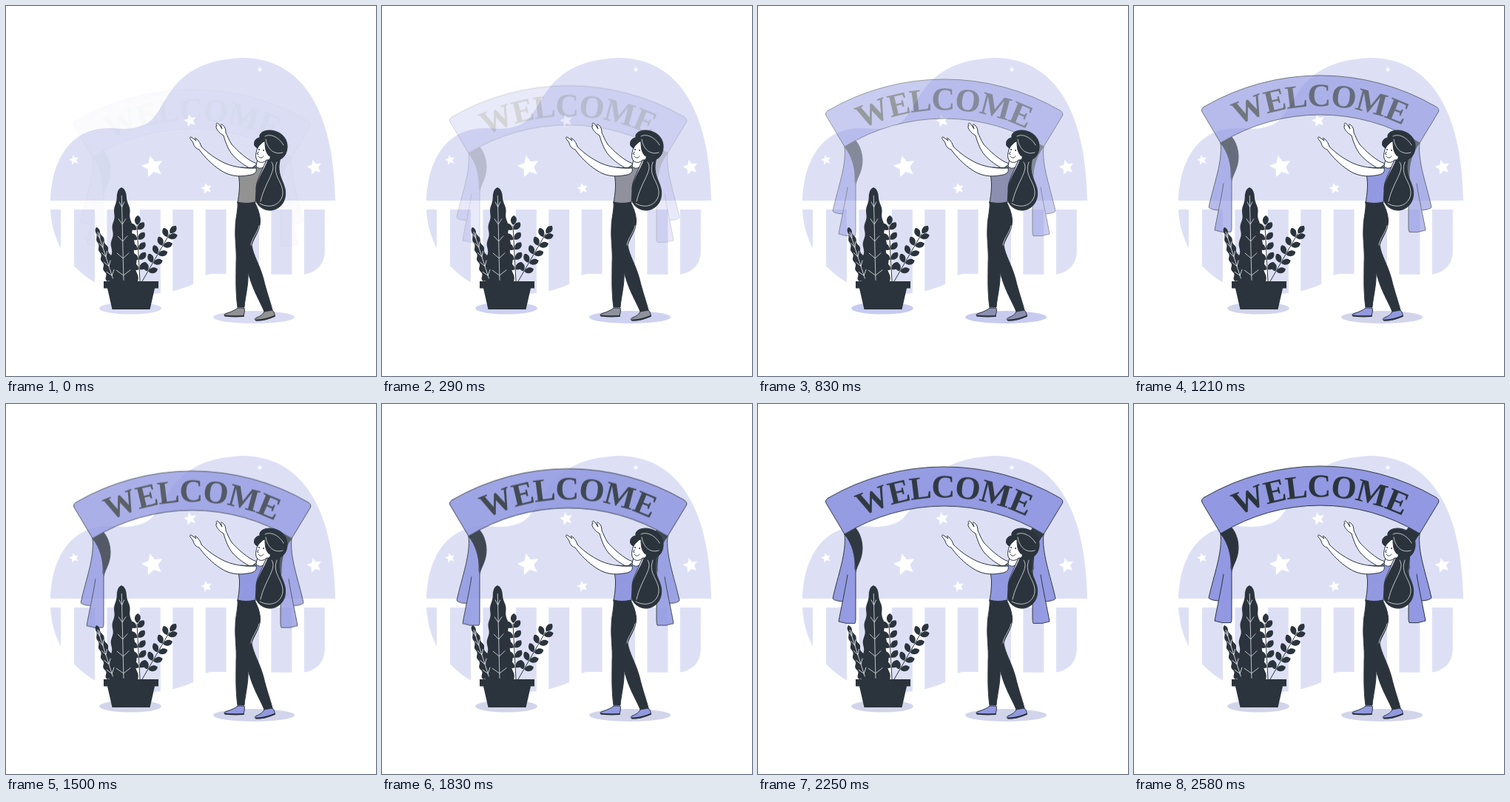
Write an HTML page that moves like this. It is 500 px wide and 500 px high and loops after 2.62 s.

```html
<!DOCTYPE html>
<html lang="en">
<head>
<meta charset="utf-8">
<title>Welcome</title>
<style>
html, body { margin: 0; width: 100%; height: 100%; overflow: hidden; background: #fff; }
svg { display: block; width: 100%; height: 100%; }
.bg { fill: #dde0f5; }
.dark { fill: #2b343c; }
.skin { fill: #fff; }
.cloth { fill: #9299e2; }
.line { stroke: #2b343c; stroke-linejoin: round; stroke-linecap: round; }
.vein { fill: none; stroke: #e4e6ee; stroke-width: .8; stroke-linecap: round; }
.ink { fill: none; }
.sole { fill: none; stroke-width: 2; }
.title { font: bold 44px "Liberation Serif", "Times New Roman", serif; letter-spacing: -1.3px; text-anchor: middle; }
.banner { animation: rise 2620ms cubic-bezier(0, 0, .55, 1) infinite; }
.top { animation: tint 2620ms linear infinite; }
.shade { animation: shade 2620ms linear infinite; }
@keyframes rise {
  from { opacity: .035; transform: translateY(29px); }
  to { opacity: 1; transform: none; }
}
@keyframes tint {
  from { fill: #929292; }
  32% { fill: #8c8fb0; }
  46%, to { fill: #9299e0; }
}
@keyframes shade {
  from { fill: #d8dbf2; }
  19%, 32% { fill: #c7cbef; }
  46%, to { fill: #d2d5ea; }
}
</style>
</head>
<body>
<svg viewBox="0 0 500 500">
  <defs>
    <clipPath id="base">
      <path d="M60 275C62 310 75 345 119 373C150 395 215 394 253 376C262 368 267 363 278 362C320 362 360 363 398 363C420 362 431 348 431 330V275Z"/>
    </clipPath>
    <path id="arc" d="M112 167A255 255 0 0 1 391 167"/>
    <g id="drape" class="line">
      <path class="cloth" d="M117 175C120 200 108 230 101 262Q103 265 114 266L131 240V222C132 205 128 188 117 175Z"/>
      <path class="dark" d="M117 175L132 167C139 175 143 190 140 203C138 213 134 217 132 226C132 205 128 188 117 175Z"/>
      <path class="cloth" d="M121 230C118 250 112 276 109 293Q120 297 131 295.500Q132 293 132 290V222"/>
    </g>
  </defs>

  <path class="bg" d="M60 263C62 210 85 165 140 165C160 166 170 168 190 159C220 142 215 75 318 70C400 70 443 140 445 263Z"/>
  <g id="fence" class="bg" clip-path="url(#base)"></g>
  <g id="stars" fill="#fff"></g>
  <g class="shade">
    <ellipse cx="168" cy="408.500" rx="42" ry="8"/>
    <ellipse cx="335" cy="420.500" rx="55" ry="8.500"/>
  </g>

  <g class="banner">
    <use href="#drape"/>
    <use href="#drape" transform="translate(503) scale(-1 1)"/>
    <path class="cloth line" d="M95 126A312 312 0 0 1 408 126Q413 129 411.500 133L386 175A257 257 0 0 0 117 175L92 133Q90 129 95 126Z"/>
    <text class="title dark"><textPath href="#arc" startOffset="49.800%">WELCOME</textPath></text>
  </g>

  <g id="plant" class="dark">
    <path d="M132 372H206V381.500H201L194.500 410H143.500L137 381.500H132Z"/>
  </g>

  <g class="line">
    <path class="dark" d="M354 208C351 220 337 236 336 256C337 271 350 277 359 276C372 274 380 262 377 247C374 234 365 226 371 205Z"/>
    <path class="skin" d="M339 213C328 210 312 195 305 187C301 181 299 175 297 171C297 167 296 163 293 161C291 159 290 159 291 163L292 166L287 159C285 157 283 159 285 162L284 162C283 165 288 172 294 175C297 186 301 195 306 201C314 210 323 216 331 220Z"/>
    <path class="top" d="M318 218C327 219 332 219 337 217L348 217C344 228 337 237 338 250L337 266Q325 269 313 266C315 254 317 240 314 228Z"/>
    <path class="skin" d="M340 207L338 216C339 219 345 221 348 217L353 206Z"/>
    <path class="skin" d="M338 219C320 220 304 217 291 210C278 203 270 196 264 190C263 186 261 183 258 180C255 177 255 178 257 182L250 177C248 177 248 179 251 182L253 185C254 190 257 193 261 194C269 205 278 214 290 222C302 230 314 231 326 229C334 228 340 226 338 219Z"/>
    <path class="dark" d="M313 265Q325 268 336 265C341 275 345 286 343 296C341 307 335 313 332 323C334 337 343 350 348 369C352 386 357 399 360 411L349 413C344 400 334 386 327 359C328 377 323 393 322 407H313C310 386 311 365 311 348C312 330 309 314 310 300C310 286 314 276 313 265Z"/>
    <path class="top" d="M313 408H322C323 412 322 415 321 419H297C293 418 295 416 299 415C305 413 310 411 313 408Z"/>
    <path class="top" d="M349 413L360 411C362 413 364 417 363 419C356 422 350 425 339 425C335 425 336 422 339 421C344 419 348 416 349 413Z"/>
    <path class="sole" d="M296 418.500Q308 420 321 419M338 424.500C348 425 356 422 363 419"/>
  </g>
  <path class="vein" d="M342 297C340 307 332 314 331 323M359 211C367 222 350 237 344 264M366 211C359 230 375 237 374 254C372 268 358 275 343 267"/>

  <g class="line">
    <path class="dark" d="M340 192C333 190 334 179 343 178C341 170 353 166 363 169C375 172 381 182 380 192C379 204 370 211 357 209Z"/>
    <path class="skin" d="M342 186C338 196 336 203 339 208C342 213 349 212 352 208C357 209 359 203 355 202C351 198 350 192 350 183Z"/>
    <path class="dark" d="M340 192C342 187 350 183 351 178C352 188 354 196 358 202L364 194L353 173L343 179Z"/>
    <path class="ink" d="M341 203C343 206 346 206 348 203M341 197L339.500 200L341 200.500"/>
  </g>
  <g class="dark"><circle cx="342" cy="194" r="1"/><circle cx="348" cy="195" r="1"/></g>
  <path class="vein" d="M350 176C357 172 369 177 375 188M351 180C353 193 362 202 374 198"/>
</svg>
<script>
const add = (parent, tag, attrs) => {
  const el = document.createElementNS("http://www.w3.org/2000/svg", tag);
  for (const k in attrs) el.setAttribute(k, attrs[k]);
  parent.append(el);
  return el;
};
const [fence, stars, plant] = ["fence", "stars", "plant"].map(id => document.getElementById(id));
const range = (n, fn) => Array.from({ length: n }, (_, i) => fn(i));
const deg = a => a * 180 / Math.PI;

add(fence, "rect", { x: 60, y: 275, width: 14, height: 120 });
range(8, i => add(fence, "rect", { x: 92 + 44.4 * i, y: 275, width: 28, height: 120 }));

const star = (x, y, r) => {
  const points = range(10, i => {
    const a = i * Math.PI / 5 - 1.8, d = i % 2 ? r * .47 : r;
    return [x + d * Math.cos(a), y + d * Math.sin(a)];
  });
  add(stars, "polygon", { points: points.join(" ") });
};
star(249, 155, 9);
star(198, 217, 15.5);
star(92, 208, 6.8);
star(271, 246.5, 7.7);
star(417, 218, 10.5);
star(343, 86, 3.5);

// A wavy blade hanging from its tip, with V-shaped veins.
const blade = (x, y, dx, len, width) => {
  const g = add(plant, "g", { transform: `translate(${x} ${y}) rotate(${-deg(Math.atan2(dx, len))})` });
  const half = t => width * t ** .45 + 1.3 * t ** .3 * Math.sin(t * Math.PI * 11);
  const side = s => range(61, i => [s * half(i / 60), len * i / 60]);
  add(g, "polygon", { points: [...side(-1), ...side(1).reverse()].join(" ") });
  const veins = range(5, i => {
    const t = .21 + .18 * i, w = width * t * .45 + 1.5, v = len * t;
    return `M${-w} ${v - 7}L0 ${v}L${w} ${v - 7}`;
  });
  add(g, "path", { class: "vein", d: `M0 ${len * .09}V${len * .98}` + veins.join("") });
};

// A straight stem with pairs of leaves and one at the end.
const branch = (x0, y0, x1, y1, pairs) => {
  const turn = deg(Math.atan2(y1 - y0, x1 - x0));
  const leaf = (t, a) => add(plant, "path", {
    d: "M1 0C4 -5 10 -6 14 -1C12 5 5 5 1 0Z",
    transform: `translate(${x0 + (x1 - x0) * t} ${y0 + (y1 - y0) * t}) rotate(${turn + a})`
  });
  add(plant, "path", { class: "line", d: `M${x0} ${y0}L${x1} ${y1}` });
  range(pairs, i => {
    const t = .2 + .72 * i / (pairs - 1);
    leaf(t, -48);
    leaf(t, 48);
  });
  leaf(1, 12);
};

branch(181, 372, 177, 297, 5);
branch(184, 372, 221, 308, 5);
blade(156, 245, 3, 128, 19);
blade(122, 299, 24, 74, 8.5);
</script>
</body>
</html>
```
